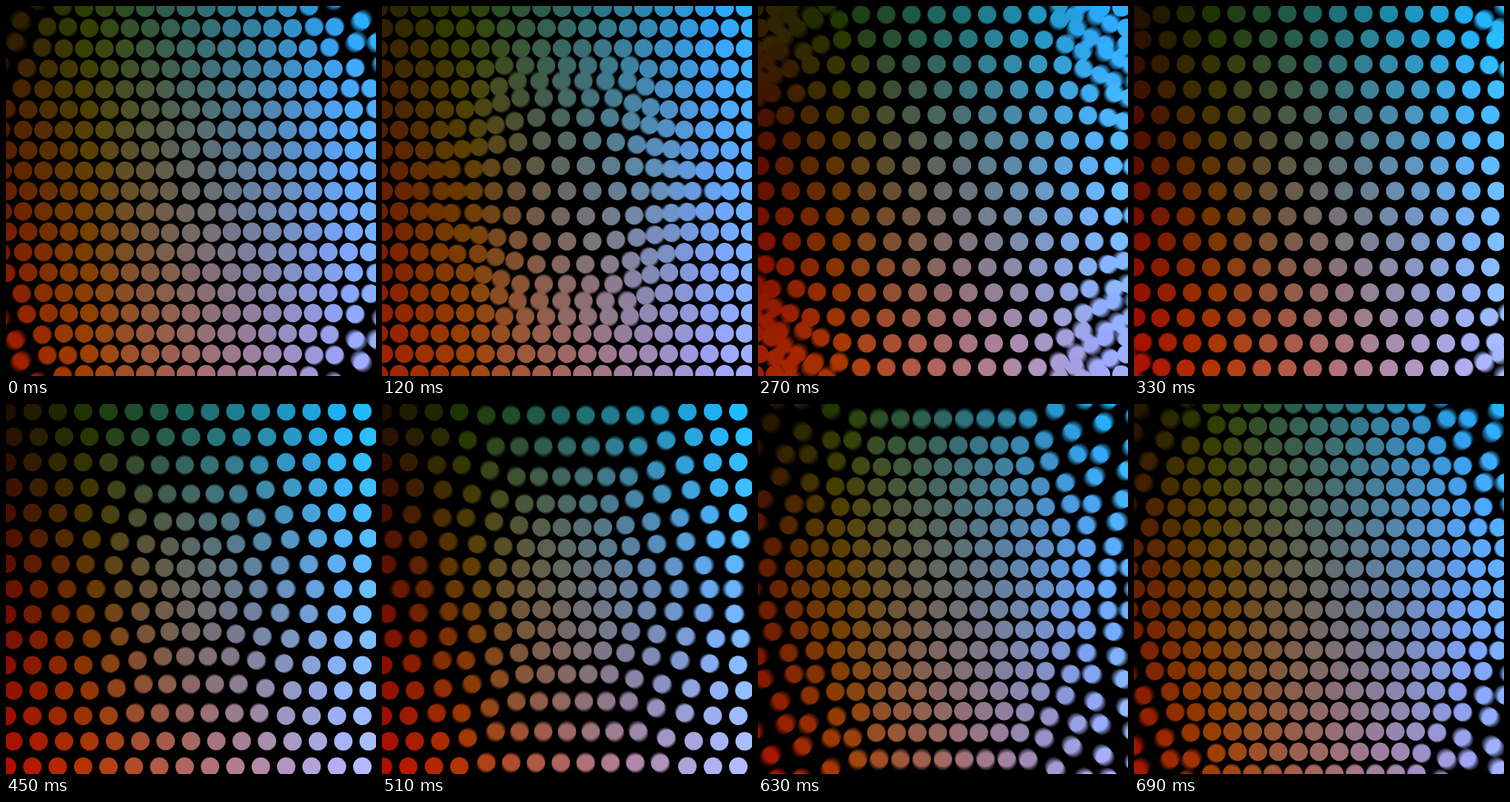
Write an HTML page with a canvas that moves like this. It is 500x500 px and loops after 0.72 s.

```html
<!DOCTYPE html>
<html lang="en">
<head>
<meta charset="utf-8">
<title>Hexagonal pulse</title>
<style>
  html, body { margin: 0; width: 100%; height: 100%; overflow: hidden; background: #000; }
  canvas { display: block; width: 500px; height: 500px; }
</style>
</head>
<body>
<canvas id="stage" width="500" height="500"></canvas>
<script>
const SIZE = 500, MID = SIZE / 2;
const LOOP = 720, STEP = 30, FRAMES = LOOP / STEP;
const NEAR = 27.5, FAR = 34.3, RADIUS = 12.5;
const EASE = 180;                 // ms a dot takes to travel
const SHUTTER = 18, SAMPLES = 8;  // motion blur

const out = document.getElementById('stage').getContext('2d');
const layer = document.createElement('canvas');
layer.width = layer.height = SIZE;
const ctx = layer.getContext('2d');

// Lattice with odd rows shifted a quarter cell; dots move in hexagonal rings.
const dots = [];
for (let row = -10; row <= 10; row++) {
  for (let col = -10; col <= 10; col++) {
    const x = col - (row % 2 ? 0.25 : 0);
    const y = Math.abs(row);
    const dist = Math.max(y, Math.abs(x) * Math.sqrt(3) / 2 + y / 2);
    dots.push({ x, y: row, ring: Math.ceil(dist - 0.12) });
  }
}

const mix = (a, b, p) => a + (b - a) * p;
const level = v => Math.round(Math.max(0, Math.min(255, v)));

function ease(ms) {
  const u = Math.max(0, Math.min(1, ms / EASE + 0.5));
  return 0.5 - 0.5 * Math.cos(Math.PI * u);
}

// 0 = packed, 1 = spread; each ring lags the previous one by one step.
function spread(t, ring) {
  const start = LOOP / 4;
  const local = ((t - ring * STEP + start) % LOOP + LOOP) % LOOP - start;
  return ease(local) - ease(local - LOOP / 2);
}

function drawDots(t) {
  ctx.fillStyle = '#000';
  ctx.fillRect(0, 0, SIZE, SIZE);
  for (const d of dots) {
    const p = spread(t, d.ring);
    const gap = mix(NEAR, FAR, p);
    const dx = d.x * gap, dy = d.y * gap;
    if (Math.max(Math.abs(dx), Math.abs(dy)) > MID + RADIUS) continue;
    const r = level(104 + dy * mix(0.24, 0.31, p));
    const g = level(104 + dx * mix(0.29, 0.36, p));
    const b = level(100 + dx * 0.72);
    ctx.fillStyle = `rgb(${r},${g},${b})`;
    ctx.beginPath();
    ctx.arc(MID + dx, MID + dy, RADIUS, 0, 2 * Math.PI);
    ctx.fill();
  }
}

function render(frame) {
  for (let i = 0; i < SAMPLES; i++) {
    drawDots(frame * STEP + SHUTTER * (i + 0.5) / SAMPLES);
    out.globalAlpha = 1 / (i + 1);  // running average
    out.drawImage(layer, 0, 0);
  }
}

const origin = performance.now();
let shown = -1;
function tick() {
  const frame = Math.floor((performance.now() - origin) / STEP) % FRAMES;
  if (frame !== shown) render(shown = frame);
  requestAnimationFrame(tick);
}
tick();
</script>
</body>
</html>
```
